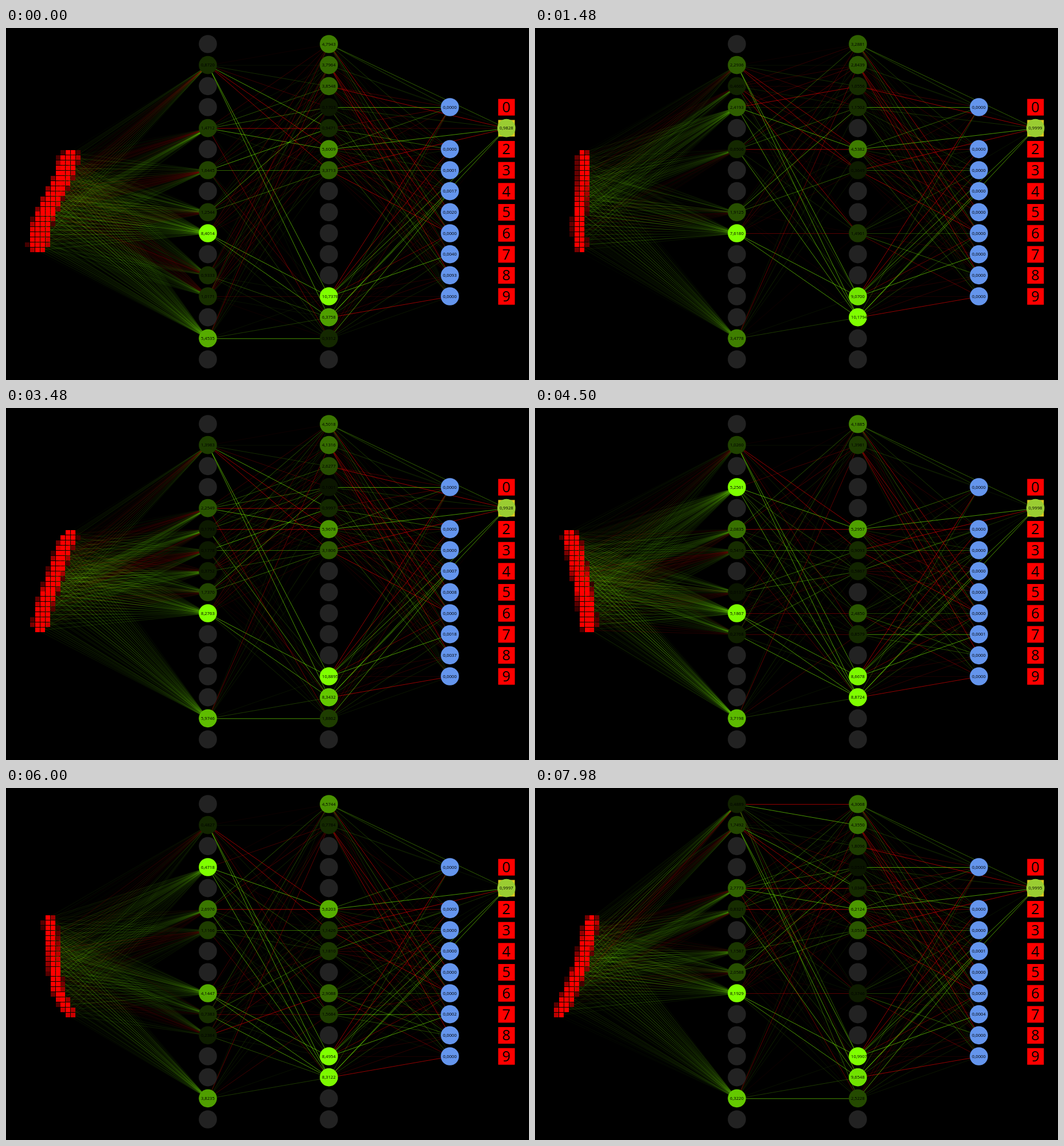
These frames come from a looping animation (912 by 614 pixels, 8 s). An HTML page:

```html
<!DOCTYPE html>
<html lang="en">
<head>
<meta charset="utf-8">
<title>Digit network</title>
<style>
html, body { margin: 0; width: 100%; height: 100%; overflow: hidden; background: #000; }
svg { display: block; width: 912px; height: 614px; }
.val { font: 7.7px 'Open Sans', 'Noto Sans', sans-serif; }
.digit { font: 25.5px 'Open Sans', 'Noto Sans', sans-serif; text-anchor: middle; }
</style>
</head>
<body>
<svg id="stage" viewBox="0 0 912 614"></svg>
<script>
const LOOP = 8000, NODES = 16, ROWS = 20, CELL = 8.93, RADIUS = 15.8;
const X1 = 352, X2 = 563, X3 = 774, XWIN = 872.6;
const POS = '#7fff00', NEG = '#f00';
const stage = document.getElementById('stage');

const nodeY = i => 28 + i * 550 / (NODES - 1);
const lerp = (a, b, t) => a + (b - a) * t;
const blend = (a, b, t) => a.map((v, i) => lerp(v, b[i], t));
const rand = (a, b, c) => {
  const s = Math.sin(a * 127.1 + b * 311.7 + c * 74.7) * 43758.5453;
  return s - Math.floor(s);
};

// Strong links by sending node; every other weight is seeded.
const hidden = {
  seed: 3,
  green: {0: [1], 1: [4, 12, 13], 3: [5, 13], 4: [5], 5: [13], 6: [4], 8: [3], 9: [12, 13], 10: [13], 14: [14]},
  red: {0: [0], 1: [5, 6], 2: [6, 9], 3: [2], 4: [4], 5: [5], 11: [9]}
};
const output = {
  seed: 9,
  green: {3: [0], 5: [1], 10: [7], 12: [1, 7], 13: [1, 4], 14: [4]},
  red: {0: [5], 1: [6, 8], 2: [1], 6: [1, 6], 12: [0, 2], 13: [9]}
};

function weight(net, i, j) {
  const has = links => (links[i] || []).includes(j);
  if (has(net.green)) return .58;
  if (has(net.red)) return -.58;
  const r = rand(i, j, net.seed);
  return (rand(j, i, net.seed + 1) < .52 ? -1 : 1) * (.06 + .34 * r * r);
}

// Smooth bands of sign along the digit, strongest in the middle rows.
function pixelWeight(row, col, j) {
  const bias = [3, 9, 14].includes(j) ? .4 : .08 + .25 * Math.sin(row * .3 + j * 2.4);
  const reach = .35 + .65 * Math.exp(-(((row - 9) / 7) ** 2));
  return reach * (bias + .7 * (rand(row, col, j) - .5));
}

// A pose holds the active nodes; the rest sit below zero.
const fill = (o, n, rest) => Array.from({length: n}, (_, i) => i in o ? o[i] : rest);
const pose = (h1, h2, out) => ({h1: fill(h1, NODES, -.8), h2: fill(h2, NODES, -.8), out: fill(out, 10, 0)});
const mixPose = (a, b, t) => ({
  h1: blend(a.h1, b.h1, t), h2: blend(a.h2, b.h2, t), out: blend(a.out, b.out, t)
});

// A stroke runs down ROWS rows through evenly spaced centres.
const glyph = (pose, top, width, ...mid) => ({...pose, top, width, mid});
const mix = (a, b, t, lean = 0) => ({
  ...mixPose(a, b, t),
  top: Math.round(lerp(a.top, b.top, t)),
  width: lerp(a.width, b.width, t),
  mid: blend(a.mid, b.mid, t).map((c, i) => c + lean * (1 - i / 2))
});

const slantPose = pose(
  {1: .872, 4: 1.4712, 6: 1.6445, 8: 1.2544, 9: 8.4014, 11: .9333, 12: 1.0171, 14: 5.4535},
  {0: 4.7943, 1: 3.7964, 2: 3.8548, 3: .1703, 4: .9471, 5: 5.6009, 6: 3.3713, 12: 10.7378, 13: 6.3758, 14: .9312},
  {1: .9828, 3: .0001, 4: .0017, 5: .002, 7: .004, 8: .0093});
const leanPose = pose(
  {0: .4889, 1: 1.7492, 4: 2.7773, 5: .8321, 7: 1.1587, 8: 2.0588, 9: 8.1929, 14: 6.322},
  {0: 4.3068, 1: 4.355, 2: 1.8096, 3: .0533, 4: 1.0348, 5: 6.2124, 6: 3.0534, 9: .3746, 12: 10.9907, 13: 9.6548, 14: 2.5228},
  {1: .9995, 4: .0001, 7: .0004});
const uprightPose = pose(
  {1: 2.2936, 2: .466, 3: 2.4193, 5: .6506, 8: 1.9125, 9: 7.618, 14: 3.4778},
  {0: 3.2881, 1: 2.8439, 2: 1.0556, 3: 1.1502, 5: 4.5382, 6: .3649, 9: 1.4961, 12: 9.07, 13: 10.1794},
  {1: .9999});
const backPose = pose(
  {1: .4827, 3: 6.4718, 5: 2.6976, 6: 1.1166, 9: 4.1447, 10: .7383, 11: .2384, 14: 3.8235},
  {0: 4.5744, 1: .7784, 5: 5.6203, 6: 1.1426, 7: 1.181, 9: 2.9088, 10: 1.5684, 12: 8.4954, 13: 8.3122},
  {1: .9997, 7: .0002});

const slanted = glyph(slantPose, 0, 4, 8, 6.6, 4.1, 2.2, 1.6);
const narrow = glyph(mixPose(slantPose, leanPose, .6), 0, 3.3, 8, 6.1, 4.5, 2.8, 2);
const leaning = glyph(leanPose, 1, 2.9, 6.5, 5.5, 4.3, 2.3, .2);
const upright = glyph(uprightPose, 0, 2.4, 4.8, 4.8, 4.3, 3.8, 4.3);
const thin = glyph(mixPose(uprightPose, backPose, .4), 0, 2.3, 4.8, 4.6, 4.4, 3.7, 3.7);
const heavy = glyph(mixPose(uprightPose, backPose, .7), 0, 3.4, 2.2, 3.4, 4.4, 5.4, 5.8);
const backward = glyph(backPose, 1, 2.5, 3.8, 4.3, 4.7, 5.4, 8);

const steps = [
  [0, slanted], [500, mix(slanted, narrow, .5)], [980, mix(leaning, slanted, .3)],
  [1480, upright], [1980, mix(narrow, slanted, .3)], [2500, mix(upright, narrow, .6)],
  [2980, mix(narrow, slanted, .7)], [3480, narrow], [4000, mix(upright, heavy, .5)],
  [4500, heavy], [4980, mix(leaning, leaning, 0, 1)], [5490, mix(narrow, thin, .3)],
  [6000, backward], [6500, mix(backward, upright, .5)], [6980, thin],
  [7480, mix(thin, narrow, .4)], [7980, leaning]
];

function centreAt(mid, row) {
  const p = row / (ROWS - 1) * (mid.length - 1), i = Math.min(Math.floor(p), mid.length - 2);
  return lerp(mid[i], mid[i + 1], p - i);
}

function inkCells({top, width, mid}) {
  const cells = [];
  for (let r = 0; r < ROWS; r++) {
    const half = width / 2 * (r === 0 || r === ROWS - 1 ? .65 : 1), c = centreAt(mid, r);
    for (let col = Math.floor(c - half); col < c + half; col++) {
      const ink = Math.min(c + half, col + 1) - Math.max(c - half, col);
      if (ink > .2) cells.push({row: r + top, col, ink});
    }
  }
  return cells;
}

const line = (x1, y1, x2, y2, w) =>
  `<line x1="${x1}" y1="${y1}" x2="${x2}" y2="${y2}" stroke="${w < 0 ? NEG : POS}" stroke-opacity="${Math.abs(w).toFixed(3)}"/>`;
const disc = (x, y, color) => `<circle cx="${x}" cy="${y}" r="${RADIUS}" fill="${color}"/>`;
const box = (x, y, size, color) => `<rect x="${x}" y="${y}" width="${size}" height="${size}" fill="${color}"/>`;
const value = (x, y, v) =>
  `<text class="val" x="${x - 12}" y="${y + 2.5}">${v.toFixed(4).replace('.', ',')}</text>`;

function column(x, vals) {
  const max = Math.max(...vals);
  return vals.map((v, i) => {
    const y = nodeY(i);
    if (v <= 0) return disc(x, y, '#222');
    const k = .08 + .92 * v / max;
    return disc(x, y, `rgb(${127 * k | 0},${255 * k | 0},0)`) + value(x, y, v);
  }).join('');
}

function draw(state) {
  const {h1, h2, out} = state;
  const win = out.indexOf(Math.max(...out));
  const outX = k => k === win ? XWIN : X3;
  let lines = '', cells = '', labels = '', ends = '';

  for (const {row, col, ink} of inkCells(state)) {
    const x = Math.round(41.9 + col * CELL), y = Math.round(213.3 + row * CELL);
    cells += box(x, y, 8, `rgb(${255 * ink | 0},0,0)`);
    h1.forEach((v, j) => {
      if (v > 0) lines += line(x + 4, y + 4, X1, nodeY(j), .35 * ink * pixelWeight(row, col, j));
    });
  }
  h1.forEach((v, i) => h2.forEach((u, j) => {
    if (v > 0 && u > 0) lines += line(X1, nodeY(i), X2, nodeY(j), weight(hidden, i, j));
  }));
  h2.forEach((v, i) => out.forEach((_, k) => {
    if (v > 0) lines += line(X2, nodeY(i), outX(k), nodeY(k + 3), weight(output, i, k));
  }));
  out.forEach((v, k) => {
    const y = nodeY(k + 3), won = k === win;
    labels += box(858.3, y - 14.3, 29, won ? '#d8c820' : NEG) +
      `<text class="digit" x="872.5" y="${y + 9}">${k}</text>`;
    ends += disc(outX(k), y, won ? '#9acd32' : '#6495ed') + value(outX(k), y, v);
  });

  stage.innerHTML = `${labels}<g transform="translate(.5 .5)">${lines}</g>` +
    cells + column(X1, h1) + column(X2, h2) + ends;
}

let shown = -1;
function tick(now) {
  const t = now % LOOP;
  let n = steps.length - 1;
  while (steps[n][0] > t) n--;
  if (n !== shown) draw(steps[shown = n][1]);
  requestAnimationFrame(tick);
}
tick(0);
</script>
</body>
</html>
```
